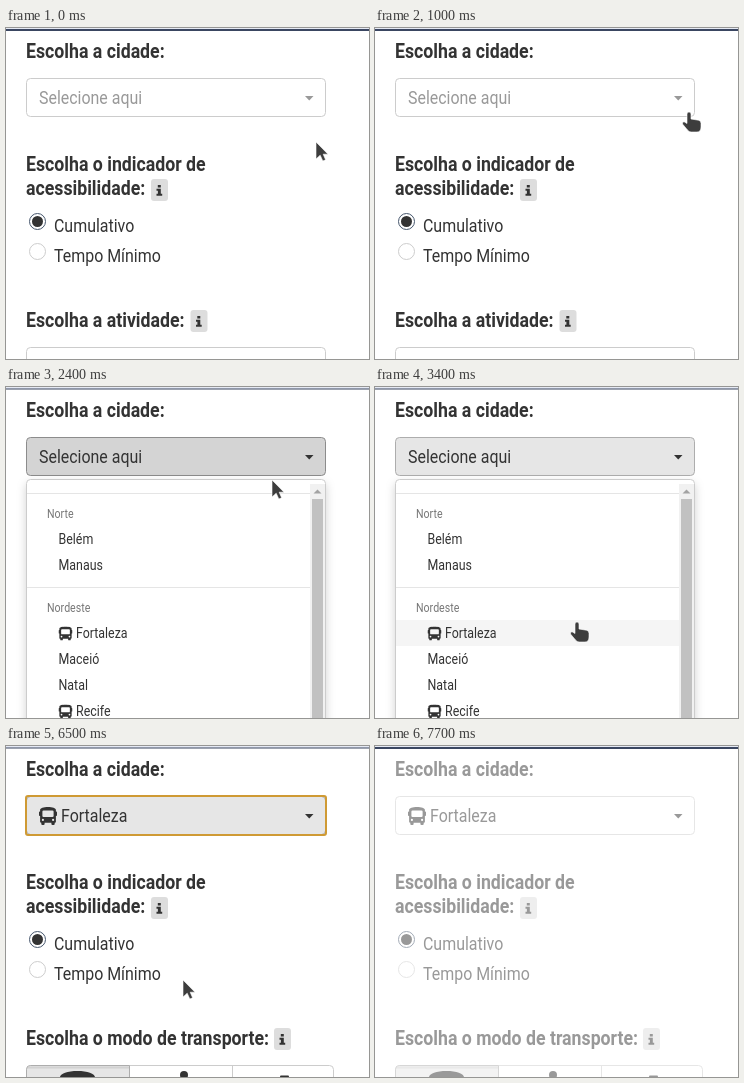
An HTML page that plays this animation: 363 by 331 pixels, repeating every 7800 ms.

```html
<!DOCTYPE html>
<html lang="pt-BR">
<head>
<meta charset="utf-8">
<title>Escolha a cidade</title>
<style>
html, body { margin: 0; width: 100%; height: 100%; overflow: hidden; background: #fff; }
svg { display: block; }
text { font: 18px Roboto, sans-serif; font-stretch: 75%; font-variation-settings: "wdth" 75; fill: #333; }
.h { font-size: 20px; font-weight: 700; }
.item { font-size: 14px; }
.group { font-size: 12px; fill: #777; }
.toggle text, .caret { fill: currentColor; }
.box { fill: #fff; stroke: #ccc; }
.ring { fill: none; stroke: #cf9a34; stroke-width: 2; }
.menu { filter: drop-shadow(0 4px 5px rgba(0, 0, 0, .18)); }
/* used only where no condensed face is available */
.wide text { transform: scaleX(.886); transform-box: fill-box; transform-origin: left; }

.page, .bar, .toggle, .field, .before, .after, .open, .hover, .press, .focus, .cursor, .hand, .arrow {
  animation: 7.8s step-end infinite;
}
.page { animation-name: fade; }
.bar { animation-name: bar; }
.toggle { animation-name: ink; }
.field { animation-name: field; }
.before { animation-name: before; }
.after { animation-name: after; }
.open { animation-name: open; }
.hover { animation-name: hover; }
.press { animation-name: press; }
.focus { animation-name: focus; }
.cursor { animation-name: move; }
.hand { animation-name: hand; }
.arrow { animation-name: arrow; }

@keyframes fade {
  0% { opacity: 1; } 92.3% { opacity: .88; } 93.58% { opacity: .75; }
  94.87% { opacity: .62; } 96.15%, 100% { opacity: .5; }
}
@keyframes bar { 0% { opacity: 1; } 21.79% { opacity: .5; } 92.3%, 100% { opacity: 1; } }
@keyframes ink { 0% { color: #999; } 21.79%, 100% { color: #333; } }
@keyframes field {
  0% { fill: #fff; stroke: #ccc; }
  14.1% { fill: #e6e6e6; stroke: #adadad; }
  21.79% { fill: #d4d4d4; stroke: #8c8c8c; }
  33.33% { fill: #e6e6e6; stroke: #adadad; }
  98.71%, 100% { fill: #fff; stroke: #ccc; }
}
@keyframes before { 0% { opacity: 1; } 64.1%, 100% { opacity: 0; } }
@keyframes after { 0% { opacity: 0; } 64.1%, 100% { opacity: 1; } }
@keyframes open { 0% { opacity: 0; } 24.35% { opacity: 1; } 64.1%, 100% { opacity: 0; } }
@keyframes focus { 0% { opacity: 0; } 64.1% { opacity: 1; } 98.71%, 100% { opacity: 0; } }
@keyframes press { 0% { opacity: 0; } 61.53% { opacity: 1; } 64.1%, 100% { opacity: 0; } }
@keyframes hover {
  0% { opacity: 0; transform: translateY(139px); }
  37.17% { opacity: 1; transform: translateY(139px); }
  38.46% { opacity: 1; transform: translateY(165px); }
  39.74% { opacity: 0; transform: translateY(165px); }
  42.3%, 100% { opacity: 1; transform: translateY(233px); }
}
@keyframes hand {
  0% { opacity: 0; } 12.82% { opacity: 1; } 30.76% { opacity: 0; } 37.17% { opacity: 1; }
  39.74% { opacity: 0; } 42.3% { opacity: 1; } 64.1%, 100% { opacity: 0; }
}
@keyframes arrow {
  0% { opacity: 1; } 12.82% { opacity: 0; } 30.76% { opacity: 1; } 37.17% { opacity: 0; }
  39.74% { opacity: 1; } 42.3% { opacity: 0; } 64.1%, 100% { opacity: 1; }
}
@keyframes move {
  0% { transform: translate(310px, 114px); opacity: 1; }
  1.28% { transform: translate(309px, 110px); }
  2.56% { transform: translate(308px, 107px); }
  12.82% { transform: translate(314px, 84px); }
  14.1% { transform: translate(310px, 80px); }
  15.38% { transform: translate(306px, 76px); }
  16.66% { transform: translate(302px, 73px); }
  17.94% { transform: translate(300px, 71px); }
  30.76% { transform: translate(266px, 93px); }
  33.33% { transform: translate(264px, 98px); }
  34.61% { transform: translate(258px, 112px); }
  35.89% { transform: translate(250px, 132px); }
  37.17% { transform: translate(240px, 155px); }
  38.46% { transform: translate(229px, 178px); }
  39.74% { transform: translate(217px, 201px); }
  41.02% { transform: translate(207px, 220px); }
  42.3% { transform: translate(200px, 232px); }
  43.58% { transform: translate(202px, 235px); }
  83.33% { transform: translate(177px, 234px); }
  84.61% { transform: translate(115px, 239px); }
  85.89% { transform: translate(61px, 243px); opacity: 1; }
  92.3%, 100% { transform: translate(61px, 243px); opacity: 0; }
}
</style>
</head>
<body>
<svg width="363" height="331" viewBox="0 0 363 331">
  <defs>
    <symbol id="bus" viewBox="0 0 18 18">
      <path fill="#333" fill-rule="evenodd" d="M1.1 2.8C1.1 1.2 4.6 0 9 0s7.9 1.2 7.9 2.8v1.7h.3q.8 0 .8.8v2.9q0 .8-.8.8h-.3v5.8q0 1-1 1h-.2v1.1q0 1.1-1.1 1.1h-1.1q-1.1 0-1.1-1.1v-1.1H5.6v1.1q0 1.1-1.1 1.1H3.4q-1.1 0-1.1-1.1v-1.1q-1.2 0-1.2-1.1V9H.8Q0 9 0 8.200V5.300q0-.8.8-.8h.3ZM4.500 3.400q-1.100 0-1.100 1.100V9q0 1.100 1.100 1.100h9q1.100 0 1.100-1.100V4.500q0-1.100-1.100-1.100ZM2.800 12.900a1.100 1.100 0 0 0 2.200 0a1.100 1.100 0 0 0-2.200 0ZM13 12.900a1.100 1.100 0 0 0 2.200 0a1.100 1.100 0 0 0-2.200 0Z"/>
    </symbol>
    <g id="info">
      <rect width="17" height="22" rx="3" fill="#ddd"/>
      <path fill="#333" d="M6.800 6h3v2.600h-3ZM5.500 9.800h4.300v5h1.400v2H5.500v-2h1.400v-3H5.500Z"/>
    </g>
  </defs>

  <g class="page">
    <text class="h" x="20" y="30">Escolha a cidade:</text>
    <g class="toggle">
      <rect class="box field" x="20.5" y="50.500" width="299" height="38" rx="4"/>
      <rect class="ring focus" x="20" y="50" width="300" height="39" rx="2"/>
      <text class="before" x="33" y="76">Selecione aqui</text>
      <g class="after">
        <use href="#bus" x="33" y="61" width="18" height="18"/>
        <text x="55" y="76">Fortaleza</text>
      </g>
      <path class="caret" d="M299 68h8.500l-4.250 4.500Z"/>
    </g>

    <text class="h" id="title" x="20" y="143">Escolha o indicador de</text>
    <text class="h" x="20" y="167">acessibilidade:</text>
    <use href="#info" x="145" y="151"/>
    <circle cx="31.500" cy="193.500" r="8" fill="#fff" stroke="#46566c"/>
    <circle cx="31.500" cy="193.500" r="5.500" fill="#333"/>
    <circle cx="31.500" cy="223.500" r="8" fill="#fff" stroke="#ccc"/>
    <text x="48" y="204">Cumulativo</text>
    <text x="48" y="234">Tempo Mínimo</text>

    <g class="before">
      <text class="h" x="20" y="299">Escolha a atividade:</text>
      <use href="#info" x="184.500" y="282"/>
      <rect class="box" x="20.500" y="319.500" width="299" height="38" rx="4"/>
    </g>
    <g class="after">
      <text class="h" x="20" y="299">Escolha o modo de transporte:</text>
      <use href="#info" x="268" y="282"/>
      <rect class="box" x="20.500" y="319.500" width="307" height="50" rx="4"/>
      <path d="M226.500 320v11" stroke="#ccc"/>
      <path d="M123.500 331v-11.500h-99q-4 0-4 4v7.500" fill="#e6e6e6" stroke="#adadad"/>
      <path d="M22 321.500h101" stroke="#d2d2d2" stroke-width="2"/>
      <use href="#bus" x="51.500" y="325" width="40" height="40"/>
      <circle cx="178" cy="329" r="4" fill="#333"/>
      <rect x="274" y="329.500" width="9" height="3" rx="1" fill="#333"/>
    </g>

    <g class="open">
      <rect class="box menu" x="20.500" y="92.500" width="299" height="260" rx="4"/>
      <rect class="hover" x="21" width="283" height="26" fill="#f5f5f5"/>
      <path d="M21 106.500h283M21 200.500h283" stroke="#e5e5e5"/>
      <text class="group" x="41" y="131">Norte</text>
      <text class="item" x="52.500" y="157">Belém</text>
      <text class="item" x="52.500" y="183">Manaus</text>
      <text class="group" x="41" y="225">Nordeste</text>
      <use href="#bus" x="52.500" y="239.500" width="14" height="14"/>
      <text class="item" x="70" y="251">Fortaleza</text>
      <text class="item" x="52.500" y="277">Maceió</text>
      <text class="item" x="52.500" y="303">Natal</text>
      <use href="#bus" x="52.500" y="317.500" width="14" height="14"/>
      <text class="item" x="70" y="329">Recife</text>
      <rect class="ring press" x="22" y="234" width="281" height="24" rx="1"/>
      <rect x="304" y="97" width="15" height="234" fill="#f1f1f1"/>
      <path d="M307.500 106.500h8l-4-4Z" fill="#a3a3a3"/>
      <rect x="306" y="112" width="11" height="219" fill="#c1c1c1"/>
    </g>
  </g>

  <rect width="363" height="2" fill="#e6eaf4"/>
  <rect class="bar" y="1" width="363" height="2" fill="#3a4661"/>

  <g class="cursor" fill="#3d3d3d" stroke="#fff" stroke-width=".6">
    <path class="arrow" d="M0 0V17L4.200 13.200 6.800 19 9.600 17.800 7.200 12.200H12Z"/>
    <path class="hand" d="M-2 2a2 2 0 0 1 4 0V7l7.500 1.200q2.500.5 2.500 3V15q0 5-4 5H2Q0 20-1.500 18L-6.500 12q-.5-2 1.500-2.300L-2 11.500Z"/>
  </g>
</svg>
<script>
const title = document.getElementById('title');
if (title.getComputedTextLength() > 190) title.ownerSVGElement.classList.add('wide');
</script>
</body>
</html>
```
